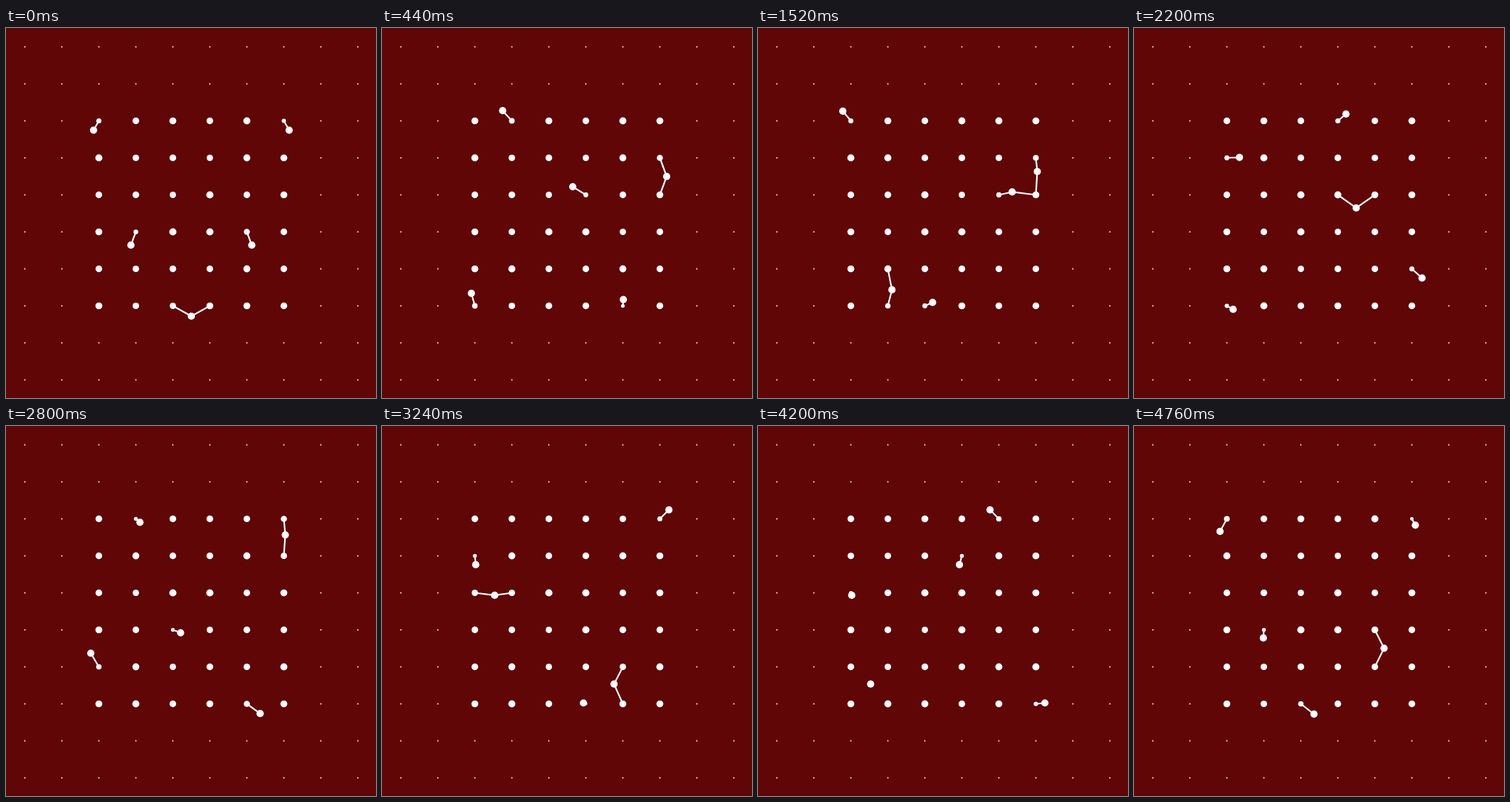
Recreate the animation shown at these times as an HTML page with a canvas. Size 520x520 px, loop 4.8 s.

```html
<!DOCTYPE html>
<html lang="en">
<head>
<meta charset="utf-8">
<title>Elastic grid</title>
<style>
  html, body { margin: 0; width: 100%; height: 100%; overflow: hidden; background: #600606; }
  canvas { display: block; width: 520px; height: 520px; }
</style>
</head>
<body>
<canvas id="stage" width="520" height="520"></canvas>
<script>
const ctx = document.getElementById('stage').getContext('2d');
const SIZE = 520, CELL = 52, COUNT = 10;
const STEP = 40, STEPS = 120, SUBSTEPS = 4;
const ORBIT = 144.5, REACH = 33.6, BALL = 5.1;
const R_NEAR = 1.7, R_FAR = 5.2, EASE = 0.3;
const TURN = Math.PI * 2;

const dots = Array.from({ length: COUNT * COUNT }, (_, i) => ({
  x: CELL * (i % COUNT + 0.5),
  y: CELL * (Math.floor(i / COUNT) + 0.5)
}));

// Five balls on ellipses that differ only in their x and y phases.
function ballsAt(step) {
  const a = TURN * step / STEPS;
  return Array.from({ length: 5 }, (_, j) => ({
    x: SIZE / 2 + ORBIT * Math.sin(a - TURN * j / 5),
    y: SIZE / 2 + ORBIT * Math.cos(a - TURN * 3 * j / 5)
  }));
}

const distance = (p, q) => Math.hypot(p.x - q.x, p.y - q.y);

// A dot eases towards a distance-based radius only while a ball is in reach.
// The first lap settles the radii, so the second one loops cleanly.
function simulate() {
  const radii = dots.map(() => 1);
  const laps = [];
  for (let n = 0; n < STEPS * SUBSTEPS * 2; n++) {
    for (const ball of ballsAt(n / SUBSTEPS)) {
      dots.forEach((dot, i) => {
        const d = distance(ball, dot);
        if (d >= REACH) return;
        const goal = R_NEAR + (R_FAR - R_NEAR) * d / REACH;
        radii[i] += (goal - radii[i]) * EASE;
      });
    }
    if (n % SUBSTEPS === 0) laps[n / SUBSTEPS % STEPS] = radii.slice();
  }
  return laps;
}

const radiiAt = simulate();

function disc(p, r) {
  ctx.beginPath();
  ctx.arc(p.x, p.y, r, 0, TURN);
  ctx.fill();
}

function draw(step) {
  ctx.setTransform(1, 0, 0, 1, 0, 0);
  ctx.fillStyle = '#600606';
  ctx.fillRect(0, 0, SIZE, SIZE);
  ctx.translate(0.5, 0.5);
  ctx.fillStyle = '#fff';
  ctx.strokeStyle = '#fff';
  ctx.lineWidth = 2.2;
  dots.forEach((dot, i) => disc(dot, radiiAt[step][i]));
  for (const ball of ballsAt(step)) {
    for (const dot of dots) {
      if (distance(ball, dot) >= REACH) continue;
      ctx.beginPath();
      ctx.moveTo(ball.x, ball.y);
      ctx.lineTo(dot.x, dot.y);
      ctx.stroke();
    }
    disc(ball, BALL);
  }
}

const start = performance.now();
function tick() {
  draw(Math.floor((performance.now() - start) / STEP) % STEPS);
  requestAnimationFrame(tick);
}
tick();
</script>
</body>
</html>
```
